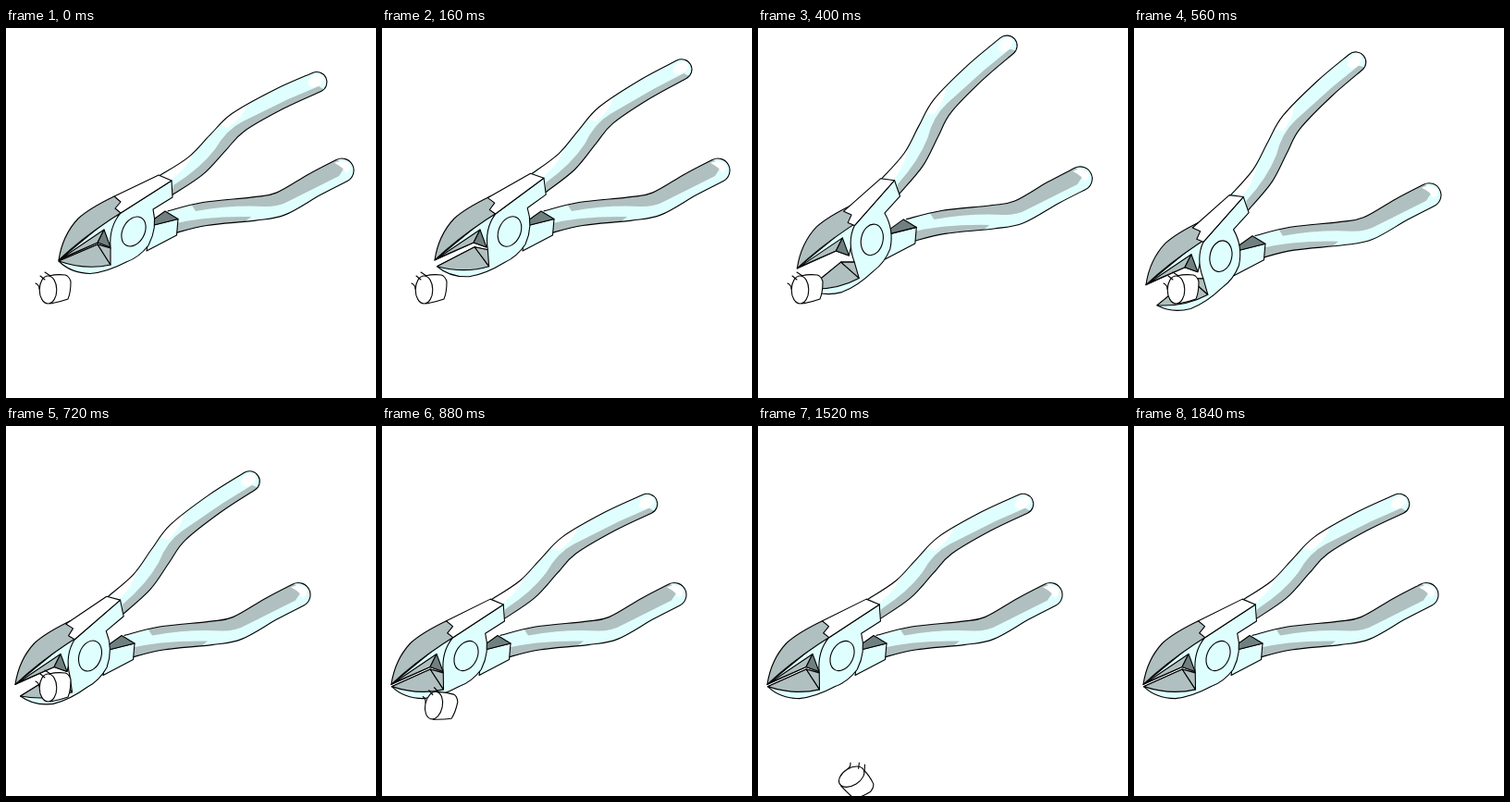
Recreate the animation shown at these times as an HTML page. Size 400 px wide and 400 px high, loop 2000 ms.

```html
<!DOCTYPE html>
<html lang="en">
<head>
<meta charset="utf-8">
<title>Cutting pliers</title>
<style>
  html, body { margin: 0; width: 100%; height: 100%; overflow: hidden; background: #fff; }
  svg { display: block; width: 100vw; height: 100vh; }
  .line { fill: none; stroke: #000; stroke-width: 1.1; stroke-linejoin: round; stroke-linecap: round; }
  .pale { fill: #dfffff; }
  .grey { fill: #b0bfbf; }
  .dark { fill: #708080; }
  .white { fill: #fff; }
</style>
</head>
<body>
<svg viewBox="0 0 400 400">
  <defs>
    <clipPath id="lowClip"><path data-handle="low"/></clipPath>
    <clipPath id="topClip"><path data-handle="top"/></clipPath>
  </defs>

  <g id="pliers">
    <!-- lower handle and upper jaw -->
    <g>
      <path class="pale" data-handle="low"/>
      <g clip-path="url(#lowClip)">
        <path class="grey" d="M200 190Q230 176 285 176L318 154L354 139L367 149L360 160L306 187Q296 193 280 193Q245 191 205 198Z"/>
        <path class="grey" d="M180 212Q215 203 265 204L250 216L180 230Z"/>
        <path class="white" d="M355 146Q364 141 372 148Q373 155 368 157Q364 150 355 146Z"/>
      </g>
      <path class="line" data-handle="low"/>
      <path class="pale line" d="M156 214L186 206.500L184.500 224L152 241Z"/>
      <path class="dark line" d="M158 208L172 198L186 206.500L156 214Z"/>
      <path class="pale line" d="M57 251L113 205L122 200L113 237L99 232Z"/>
      <path class="grey line" d="M57 251Q61 224 78 206Q90 195 117 182L130 188L124 200L113 207Q80 229 57 251Z"/>
      <path class="grey line" d="M60 249L106 218L99 232Z"/>
      <path class="dark line" d="M106 218L113 237L99 232Z"/>
    </g>

    <!-- upper handle and lower jaw -->
    <g id="mover">
      <path class="pale" data-handle="top"/>
      <g clip-path="url(#topClip)">
        <path class="grey" d="M178 185L181 170Q210 152 226 131Q238 110 256 101L305 77L338 63L350 70L270 120L232 155Z"/>
        <path class="white" d="M170 160Q186 143 204 130Q200 148 178 164Z"/>
        <path class="white" d="M230 104Q244 90 260 82Q258 95 240 108Z"/>
        <ellipse class="white" cx="335" cy="57" rx="9" ry="6" transform="rotate(-30 335 57)"/>
      </g>
      <path class="line" data-handle="top"/>
      <path class="pale line" d="M124 200L179 165L180 183L159 196Q164 216 154 235Q144 248 130 253Q109 264 91 265.500Q70 265 57 252L99 234L113 238Q111 215 124 200Z"/>
      <path class="white line" d="M117 182L165 159L179 165L124 200L118 195L124 188Z"/>
      <path class="grey line" d="M57 252L99 234L113 256Q86 262 57 252Z"/>
      <path class="grey line" d="M99 234L113 238L113 256Z"/>
      <ellipse class="line" cx="138" cy="220" rx="11.800" ry="17" transform="rotate(28 138 220)"/>
    </g>
  </g>

  <g id="wire">
    <path class="white line" d="M47 268Q54 266 64 267Q68 268 70 274Q70 286 67 293Q59 296 48 298Z"/>
    <ellipse class="white line" cx="45.500" cy="283" rx="9.300" ry="15"/>
    <path class="line" d="M32 276Q36 278 36 282M37 268L42 272M42 264L48 268"/>
  </g>
</svg>

<script>
  const STEP = 80, LAST = 23, LOOP = 2000;

  // Centre line of each handle, half-width at its root and at its tip
  const handles = {
    low: { spine: [[178, 210], [215, 201], [268, 195.5], [297, 190], [334, 169], [363, 154]], root: 12.5, tip: 13 },
    top: { spine: [[173, 170], [205, 149], [229, 124], [251, 102], [295, 77], [336, 58.5]], root: 12.5, tip: 11 }
  };

  const clamp = (v, lo, hi) => Math.min(Math.max(v, lo), hi);
  const at = (pts, i) => pts[clamp(i, 0, pts.length - 1)];

  // Catmull-Rom segments that continue from the first point
  function curve(pts) {
    return pts.slice(1).map((c, i) => {
      const a = at(pts, i - 1), b = pts[i], e = at(pts, i + 2);
      const p = b.map((v, k) => v + (c[k] - a[k]) / 6);
      const q = c.map((v, k) => v - (e[k] - b[k]) / 6);
      return `C${p} ${q} ${c}`;
    }).join('');
  }

  function handlePath({ spine, root, tip }) {
    const side = sign => spine.map(([x, y], i) => {
      const a = at(spine, i - 1), b = at(spine, i + 1);
      const dx = b[0] - a[0], dy = b[1] - a[1];
      const w = sign * (root + (tip - root) * i / (spine.length - 1)) / Math.hypot(dx, dy);
      return [x + dy * w, y - dx * w];
    });
    const upper = side(1), lower = side(-1).reverse();
    return `M${upper[0]}${curve(upper)}A${tip} ${tip} 0 0 1 ${lower[0]}${curve(lower)}`;
  }

  for (const el of document.querySelectorAll('[data-handle]'))
    el.setAttribute('d', handlePath(handles[el.dataset.handle]));

  const pliers = document.getElementById('pliers');
  const mover = document.getElementById('mover');
  const wire = document.getElementById('wire');

  function draw(time) {
    const n = Math.min(Math.floor((time % LOOP) / STEP), LAST);
    const reach = clamp((n - 4) / 3.2, 0, 1);
    const opening = 4.1 * (n - 1), closing = 16 - 3.8 * (n - 7);
    const angle = clamp(Math.min(opening, closing), Math.min(n, 0.8), 16);
    const fall = Math.max(n - 9, 0);
    pliers.setAttribute('transform', `translate(${-47 * reach} ${28.5 * reach})`);
    mover.setAttribute('transform', `rotate(${-angle} 138 220)`);
    wire.setAttribute('transform',
      `translate(${5.3 * fall} ${10.3 * fall}) rotate(${5.8 * fall} 53 282)`);
  }

  const start = performance.now();
  function tick() {
    draw(performance.now() - start);
    requestAnimationFrame(tick);
  }
  tick();
</script>
</body>
</html>
```
